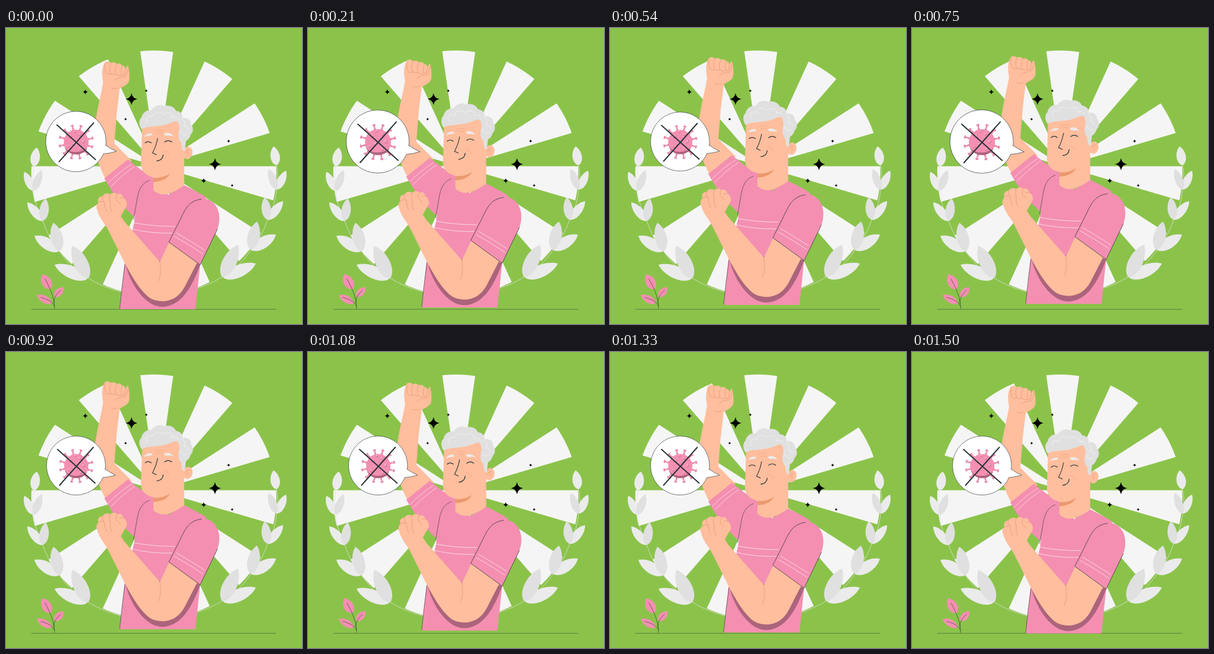
Animation, 500 px wide and 500 px high, one loop 1540 ms. Source, as an HTML page with a canvas:

```html
<!DOCTYPE html>
<html lang="en">
<head>
<meta charset="utf-8">
<title>Recovered</title>
<style>
html, body { margin: 0; width: 100%; height: 100%; overflow: hidden; background: #8bc34a; }
canvas { display: block; width: 100vw; height: 100vh; }
</style>
</head>
<body>
<canvas id="stage"></canvas>
<script>
const SIZE = 500, LOOP = 1540, CYCLE = 1500, STEP = 1000 / 24, LEAD = 36;
const GREEN = '#8bc34a', PINK = '#f48fb1', SKIN = '#ffbe9d', CREASE = '#e0966f',
      INK = '#263238', HAIR = '#e0e0e0', PALE = '#f5f5f5', SHADE = '#ab647c';

const canvas = document.getElementById('stage');
const ctx = canvas.getContext('2d');
const ratio = window.devicePixelRatio || 1;
canvas.width = canvas.height = SIZE * ratio;
ctx.lineCap = ctx.lineJoin = 'round';

function fill(d, color) {
  ctx.fillStyle = color;
  ctx.fill(new Path2D(d));
}

function line(d, color = INK, width = 0.6) {
  ctx.strokeStyle = color;
  ctx.lineWidth = width;
  ctx.stroke(new Path2D(d));
}

function disc(x, y, rx, color, ry = rx, turn = 0) {
  ctx.fillStyle = color;
  ctx.beginPath();
  ctx.ellipse(x, y, rx, ry, turn, 0, 7);
  ctx.fill();
}

// A pointed leaf from its base to its tip, w wide on both sides.
function leaf(bx, by, tx, ty, w, color) {
  const dx = tx - bx, dy = ty - by, len = Math.hypot(dx, dy);
  const at = (k, side) => [bx + dx * k - dy / len * w * side, by + dy * k + dx / len * w * side];
  ctx.fillStyle = color;
  ctx.beginPath();
  ctx.moveTo(bx, by);
  ctx.bezierCurveTo(...at(0.15, 1), ...at(0.72, 1), tx, ty);
  ctx.bezierCurveTo(...at(0.72, -1), ...at(0.15, -1), bx, by);
  ctx.fill();
}

// Rays meet slightly above the centre of the circle that cuts them off.
function rays() {
  ctx.save();
  ctx.beginPath();
  ctx.arc(249.7, 245, 207, 0, 7);
  ctx.clip();
  ctx.fillStyle = PALE;
  const wedge = Math.PI / 11;
  for (let i = 0; i < 22; i += 2) {
    ctx.beginPath();
    ctx.moveTo(254.7, 233.4);
    for (const a of [i * wedge, (i + 1) * wedge]) {
      ctx.lineTo(254.7 + 300 * Math.cos(a), 233.4 + 300 * Math.sin(a));
    }
    ctx.fill();
  }
  ctx.restore();
}

function wreath() {
  const light = '#ebebeb', dark = HAIR;
  line('M47 234C44 250 44 265 47 275C49 296 55 313 62 326C69 346 79 364 90 377C104 397 119 411 138 422C156 433 175 441 196 446', dark, 0.8);
  leaf(47, 234, 52, 202, 10.5, light);
  leaf(46, 275, 31, 243, 9, light);
  leaf(47, 275, 60, 240, 9, dark);
  leaf(62, 326, 36, 294.5, 10, light);
  leaf(62, 326, 67, 288, 10.5, dark);
  leaf(90, 377, 48, 351, 13, light);
  leaf(91, 377, 80, 329, 13.5, dark);
  leaf(137, 424, 82, 400, 14, light);
  leaf(139, 423, 112, 368, 16, dark);
}

function star(x, y, r) {
  ctx.fillStyle = '#000';
  ctx.beginPath();
  for (let i = 0; i <= 4; i++) {
    const a = i * Math.PI / 2, b = a - Math.PI / 4;
    const px = x + r * Math.cos(a), py = y + r * Math.sin(a);
    if (i) ctx.quadraticCurveTo(x + r * 0.2 * Math.cos(b), y + r * 0.2 * Math.sin(b), px, py);
    else ctx.moveTo(px, py);
  }
  ctx.fill();
}

function scenery() {
  ctx.fillStyle = GREEN;
  ctx.fillRect(0, 0, SIZE, SIZE);
  rays();
  wreath();
  ctx.save();
  ctx.translate(504, -2);
  ctx.scale(-1, 1);
  wreath();
  ctx.restore();

  line('M43 475.2H456', INK, 0.5);
  leaf(75, 441, 61, 416, 11, PINK);
  leaf(82, 454, 97, 438, 8, PINK);
  leaf(77, 465, 52, 451, 8, PINK);
  line('M82 474C82 460 79 448 66 424M81 465C80 455 86 449 92 443M82 470C77 460 68 458 59 455', INK, 0.6);

  [[212, 120, 10], [134, 108, 4.5], [237, 106, 2.6], [202, 154, 2.6],
   [376, 191, 2.8], [353, 230, 10.3], [334, 258, 4.5], [382, 266, 2.6]].forEach(s => star(...s));
}

function raisedArm() {
  fill('M164 92C161 78 162 65 167 58C171 55 176 57 177 59C181 57 186 58 187 61C191 59 196 61 196 64C199 63 201 65 202 70C203 65 206 62 207 65L208 74C209 84 209 90 206 93C202 98 196 99 192 103L187 145L183 195L212 224L172 262C160 240 149 216 150 192C147 170 155 135 161 108Z', SKIN);
  line('M177 60C174 66 175 73 177 77M187 62C184 68 184 74 186 78M196 65C194 71 194 76 196 79M202 70L200 79M167 60C166 66 167 73 170 77Q173 79 177 77Q181 80 186 78Q191 82 196 79Q199 81 201 78M207 65Q205 76 202 82Q191 82 184 88M177 101Q183 104 188 101', CREASE, 0.7);
  fill('M206 222L166 254Q187 292 216 319L249 260V253Q228 241 206 222Z', PINK);
  line('M172.500 262Q191 243 212 230M177.500 267.500Q196 248 217 234', '#fff', 0.6);
}

function torso() {
  fill('M249 252C230 259 224 271 222 286L216 331L200 400L192 475H320L328 399L350 330L337 285C326 278 312 271 300 265L274 282Z', PINK);
  line('M242 257.500C230 262 225 271 222 286L215.500 323M201 399Q196 434 192 474');
  line('M216 329Q250 335.500 285 335M214 340Q247 347.500 281 346.500', '#fff', 0.65);
}

function head() {
  disc(307, 211, 8, SKIN, 10.5, 0.2);
  line('M303 211Q306 204 311 207M306 208Q309 210 307 215', CREASE, 0.6);
  fill('M230 164L228 228C228 243 236 249 249 252V274C256 281 265 282 273 280.500Q287 276 301 266V212L300 160Q270 146 230 164Z', SKIN);
  fill('M249 253Q265 254 277 246Q270 259 249 260Z', '#eb996e');
  fill('M229 171C224 164 224 155 229 151C230 143 239 137 246 139C250 131 260 128 267 132C276 129 285 134 287 140C295 141 300 147 298 152C307 150 314 157 312 162C318 168 316 177 312 180C310 187 306 190 304 191L302 208Q297 207 297 203L296 194C290 187 291 179 293 170Q293 160 289 157.500C281 157 274 164 260 165C247 167 237 166 229 171Z', HAIR);
  line('M239 160C233 153 240 146 247 150C251 140 261 141 265 146C274 139 282 145 281 151M281 151Q289 148 292 155M297 153Q305 158 301 167Q307 166 308 173M294 173Q299 184 306 179', PALE, 0.8);
  fill('M233 184Q238 176 247 178.500Q247 182 242 182Q237 182 233 184ZM267 178Q277 174.500 283 183Q277 181 272 182Q267 182 267 178Z', '#ebebeb');
  line('M251 174Q258 171 265 174M254 177.500Q259 176 264 178M267 208Q273 208 276 215', CREASE, 0.5);
  line('M235 194Q240 190 245.500 194M268 192.500Q274 188 280 192.500', INK, 1.2);
  line('M256 186.500Q254 199 247.500 211L254 214', INK, 1.1);
  line('M255 224.500Q264.500 223.500 265.500 214.500', INK, 1.3);
}

function frontArm() {
  fill('M202 398C207 426 233 471 264 471C296 470 314 438 328 400L300 390Z', SHADE);
  fill('M154 307C151 302 154 297 156 295C154 289 157 284 163 284C165 280 171 278 176 281C180 277 186 278 188 281C193 278 198 282 198 287C203 288 205 296 204 300L194 318L200 327L260 395L276 361L323 396L304 433C294 454 280 461.500 263 461.500C250 461 241 456 235 449C222 436 212 418 202 400L172 340C165 328 156 318 154 307Z', SKIN);
  line('M163 284Q162 290 166 294M176 281Q173 287 176 293M188 281Q184 286 188 292L193 297M156 295Q161 291 166 294Q166 303 170 310M176 293Q175 304 179 311M198 287Q194 285 192 288M260 395C262 411 261 420 257 428', CREASE, 0.7);
  fill('M332 287.500C303 288 298 315 275 361.500L328 400L357 340C365 320 360 290 332 287.500Z', PINK);
  line('M330 289C307 292 302 308 291 330L275 361.500L328 400L357 340', INK, 0.75);
  line('M288 346Q310 359 335.500 375M284.500 352Q308 365 332.500 381.500', '#fff', 0.65);
}

function spike(angle) {
  ctx.save();
  ctx.translate(118.7, 192.7);
  ctx.rotate(angle);
  fill('M18 -2.500Q22 -1 26 -1L27 -2.800Q30 -2 29 0Q30 2 27 2.800L26 1Q22 1 18 2.500Z', '#e98aaa');
  ctx.restore();
}

function virus() {
  for (let i = 0; i < 12; i++) spike(-1.28 + i * Math.PI / 6);
  disc(118.7, 192.7, 20.5, PINK);
  fill('M99 199C105 213 128 211 137 202C134 210 126 213 119 213C109 213 101 207 99 199Z', SHADE);
  [[109, 184, 3], [125, 180, 2.5], [131, 192, 3], [115, 196, 2.5], [106, 200, 2.2], [126, 204, 2.6], [117, 176, 2]]
    .forEach(([x, y, r], i) => {
      disc(x, y, r, '#cf7594', r * 0.75, i);
      disc(x - 0.6, y - 1, r * 0.85, '#f7a3bf', r * 0.65, i);
    });
}

function bubble() {
  const outline = 'M167.700 198A49.800 49.800 0 1 0 163.800 212Q173 211.500 185 208Q176 204 167.700 198Z';
  fill(outline, '#fff');
  line(outline, INK, 0.65);
  virus();
  line('M87 164.500L150.500 221.500M147.500 161L90.500 225', INK, 1.9);
}

function draw(now) {
  const step = Math.floor((now % LOOP + 4) / STEP);
  const phase = Math.min(CYCLE, LEAD + step * STEP) / CYCLE;
  const lift = 10 * (1 - Math.abs(2 * phase - 1));
  // Two beats per cycle: a slow release, then a quick one.
  const beat = Math.max(0,
    phase < 0.1 ? phase / 0.1 : 1 - (phase - 0.1) / 0.2,
    1 - Math.abs(phase - 0.5) / 0.1);
  const scale = 1 + 0.1 * beat;

  ctx.setTransform(canvas.width / SIZE, 0, 0, canvas.height / SIZE, 0, 0);
  scenery();

  ctx.save();
  ctx.translate(0, 0.5 - lift);
  raisedArm();
  torso();
  head();
  frontArm();
  ctx.restore();

  ctx.save();
  ctx.translate(126.5, 192);
  ctx.scale(scale, scale);
  ctx.translate(-126.5, -192);
  bubble();
  ctx.restore();
}

function tick() {
  draw(performance.now());
  requestAnimationFrame(tick);
}
tick();
</script>
</body>
</html>
```
